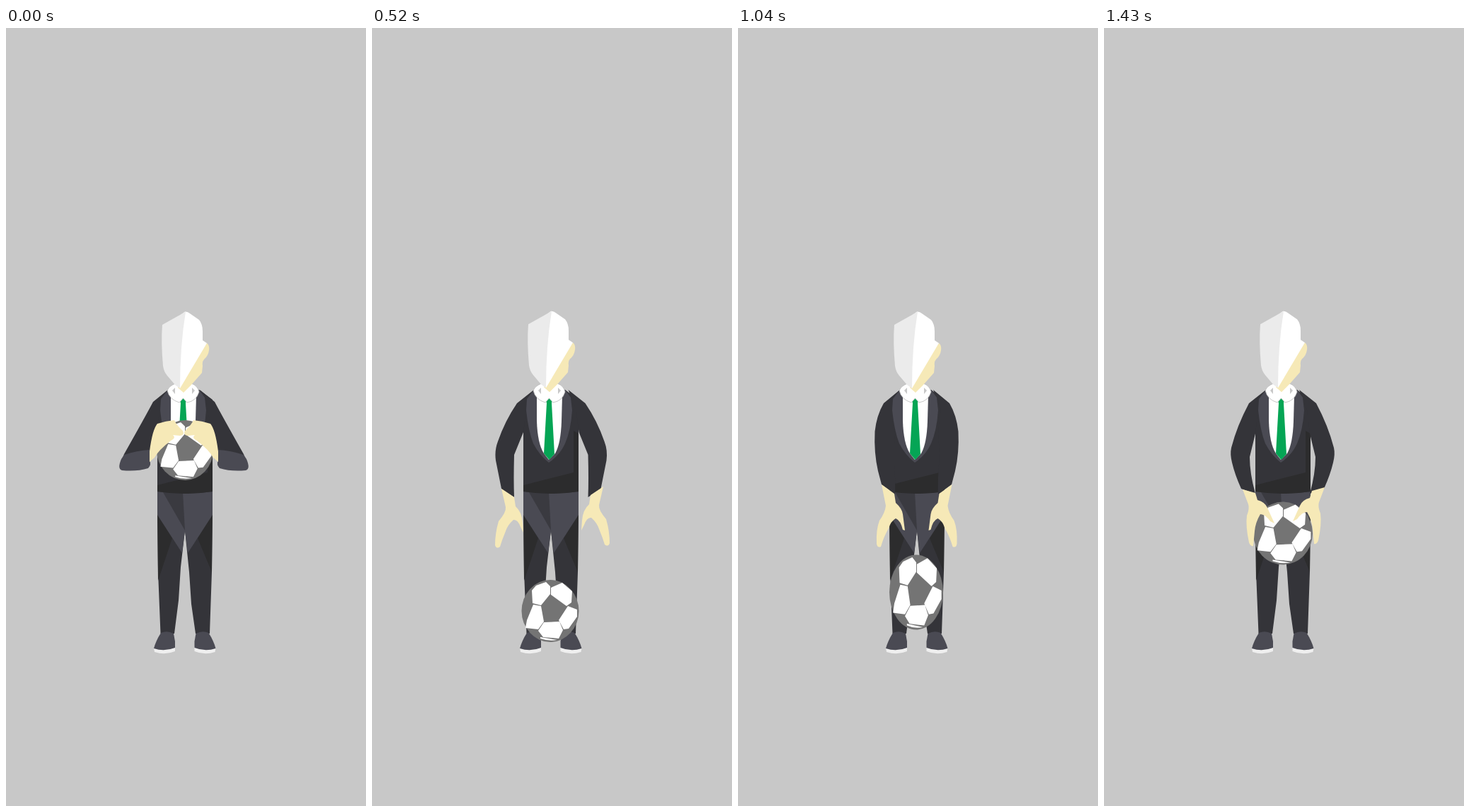
Recreate the animation shown at these times as an HTML page. Size 509x1101 px, loop 1.56 s.

```html
<!DOCTYPE html>
<html lang="en">
<head>
<meta charset="utf-8">
<title>Bouncing a ball</title>
<style>
html, body { margin: 0; width: 100%; height: 100%; overflow: hidden; background: #c8c8c8; }
svg { display: block; width: 100%; height: 100%; }
.dark { fill: #343439; }
.mid { fill: #4a4a53; }
.black { fill: #2c2c2d; }
.skin { fill: #f6e9b7; }
.white { fill: #fff; }
</style>
</head>
<body>
<svg viewBox="0 0 509 1101">
  <defs>
    <g id="shoe">
      <path fill="#efefef" d="M209 877Q224 881 239 875V882Q225 888 210 883Z"/>
      <path class="mid" d="M219 856Q228 852 237 857L239 868V877Q224 883 209 878Q212 867 219 856Z"/>
    </g>
  </defs>

  <!-- legs -->
  <path class="dark" d="M214 655L215 770L218.500 857H238L244 810L247 763L253 711L259 770L262 815L268 857H288L291 770L292 655Z"/>
  <path class="black" d="M214 688L235 722L215 782ZM292 688L271 722L291 770Z"/>
  <path class="mid" d="M214 656H292V689L257 743L253 711L249 743L214 689Z"/>
  <path fill="#3a3a40" d="M222 657H250L253 711Z"/>
  <use href="#shoe"/>
  <use href="#shoe" transform="matrix(-1 0 0 1 505.500 0)"/>

  <!-- jacket -->
  <path class="dark" d="M229 512L214 526V656Q253 662 292 656V526L273 512Z"/>
  <path class="black" d="M214 647L285 629V570L292 574V656Q253 662 214 656Z"/>
  <path id="sleeveL" class="dark"/>
  <path id="sleeveR" class="dark"/>
  <path class="mid" d="M229 512L219 525L218 541Q221 570 228 588Q237 605 250 615Q266 604 273 588Q281 570 283 541L281 523L273 512Z"/>
  <path class="white" d="M233 520V556Q234 588 243 602L250 611L259 602Q267 588 268 556L269 520Z"/>
  <path fill="#05a555" d="M250 523L254.500 527L254 531L258 603L250.500 611L243 602L247 531L246 527Z"/>

  <!-- collar and head -->
  <path class="white" stroke="#b9b9b9" stroke-width=".8" d="M228 513Q231 506 240 503H262Q271 506 273 515Q269 528 256 530L250.500 524L245 530Q231 526 228 513Z"/>
  <path fill="#c8c8c8" d="M239 509V518L235 513ZM263 509V518L267 513Z"/>
  <g id="head">
    <path class="skin" d="M284 446Q288 449 287 456Q286 464 280 469Q277 472 278 478L277 488L262 505L251 516L243 509L250 490Z"/>
    <path class="white" d="M253 401.500Q257 401 260 404L273 413Q278 419 278 429V442L284 446L246 510L235 480V415Z"/>
    <path fill="#ebebeb" d="M254 401.500L221 420Q219 445 222 478Q223 486 228 492L239 505L246 510Q246 450 254 401.500Z"/>
  </g>

  <!-- ball, centred on its own origin -->
  <g id="ball">
    <ellipse rx="40.500" ry="44" fill="#747474"/>
    <path class="white" d="M-26 -29L-20 -36L-6 -41L0 -35V-24L-13 -8L-25 -11Z
      M1 -33L17 -40L31 -28L30 -12L23 -7L1 -23Z
      M25 -7L38 -2L38 8L26 25L19 26L12 13Z
      M-9 16L13 15L18 27L12 39L-10 37L-17 28Z
      M-24 -9L-13 -7L-9 15L-17 26L-35 24L-33 13Z
      M-14 37L10 41Q-3 43 -14 39Z"/>
  </g>

  <path id="cuffL" class="mid"/>
  <path id="cuffR" class="mid"/>
  <path id="handL" class="skin"/>
  <path id="handR" class="skin"/>
</svg>

<script>
const $ = id => document.getElementById(id);
const STEP = 130;

// Left arm shapes; the right arm mirrors them, x becoming sleeveSum - x or handSum - x.
const hold = {
  sleeve: "M229 512L208 529Q198 548 167 603L164 611L204 605L214 560L218 540Z",
  cuff: "M167 604Q185 598 203 597V612Q206 618 201 623Q185 628 164 626Q157 624 163 610Z",
  hand: "M203 599Q207 568 214 560Q226 556 238 555Q241 562 250 570Q253 576 246 577L236 576Q241 580 233 584Q216 597 210 608L203 614Z",
  sleeveSum: 503, handSum: 503, lift: 0
};
const drop = {
  sleeve: "M229 512L206 531Q196 548 193.500 571Q192 601 198 627L203 646L222 660Q223 640 220 606L222 570L218 540Z",
  cuff: "",
  hand: "M203 646L221 659L223 672Q232 680 233 688L236 711L233 710Q230 697 223 694Q216 698 213 708Q206 720 202 734Q197 736 196 730Q195 710 200 697Q208 686 209 676Z",
  sleeveSum: 505, handSum: 505.5, lift: 0
};
const wide = {
  sleeve: "M229 512L205 531Q188 556 178 585Q173 598 175 612L183 652L201 664Q200 640 201 604L214 572L218 540Z",
  cuff: "",
  hand: "M183 652L201 664L203 677Q212 685 213 700L214 714L210 706Q206 695 200 696Q192 703 189 712Q184 724 181 734Q176 738 174 732Q174 715 179 698Q190 685 189 678Z",
  sleeveSum: 506.5, handSum: 510, lift: -3
};
const reach = {
  sleeve: "M229 512L205 531Q188 563 180 594Q178 603 181 615Q185 632 194 652L214 659Q206 630 206 607L214 574L218 540Z",
  cuff: "",
  hand: "M196 653L214 658L217 668Q228 671 231 679L241 701L235 698Q228 688 221 688Q214 700 213 712L211 733Q207 734 205 728Q200 705 202 690Q206 680 204 674Z",
  sleeveSum: 505, handSum: 508, lift: -3
};

const midPath = (a, b) => {
  const other = b.match(/[\d.]+/g);
  let i = 0;
  return a.replace(/[\d.]+/g, n => (+n + +other[i++]) / 2);
};

const between = (a, b) => Object.fromEntries(Object.keys(a).map(k =>
  [k, typeof a[k] === "string" ? (a[k] && midPath(a[k], b[k])) : (a[k] + b[k]) / 2]));

// Arms, then ball centre and radii, then head rise.
const poses = [
  [hold, 253, 597.5, 40, 42.5, 0],
  [reach, 253, 686, 39, 47, 0],
  [drop, 252, 798.5, 38, 53, 0],
  [between(drop, wide), 252, 857, 46, 36, 0],
  [wide, 252, 825, 40.5, 44, -.7],
  [reach, 253, 715, 42, 44.5, -.7]
];

function drawArm(part, d, sum, lift) {
  $(part + "L").setAttribute("d", d);
  $(part + "R").setAttribute("d", d);
  $(part + "R").setAttribute("transform", `matrix(-1 0 0 1 ${sum} ${lift})`);
}

function draw([arm, x, y, rx, ry, rise]) {
  drawArm("sleeve", arm.sleeve, arm.sleeveSum, 0);
  drawArm("cuff", arm.cuff, arm.sleeveSum, 0);
  drawArm("hand", arm.hand, arm.handSum, arm.lift);
  $("ball").setAttribute("transform", `translate(${x} ${y}) scale(${rx / 40.5} ${ry / 44})`);
  $("head").setAttribute("transform", `translate(0 ${rise})`);
}

const start = performance.now();
function tick() {
  const step = Math.floor((performance.now() - start) / STEP);
  draw(poses[step % poses.length]);
  requestAnimationFrame(tick);
}
tick();
</script>
</body>
</html>
```
